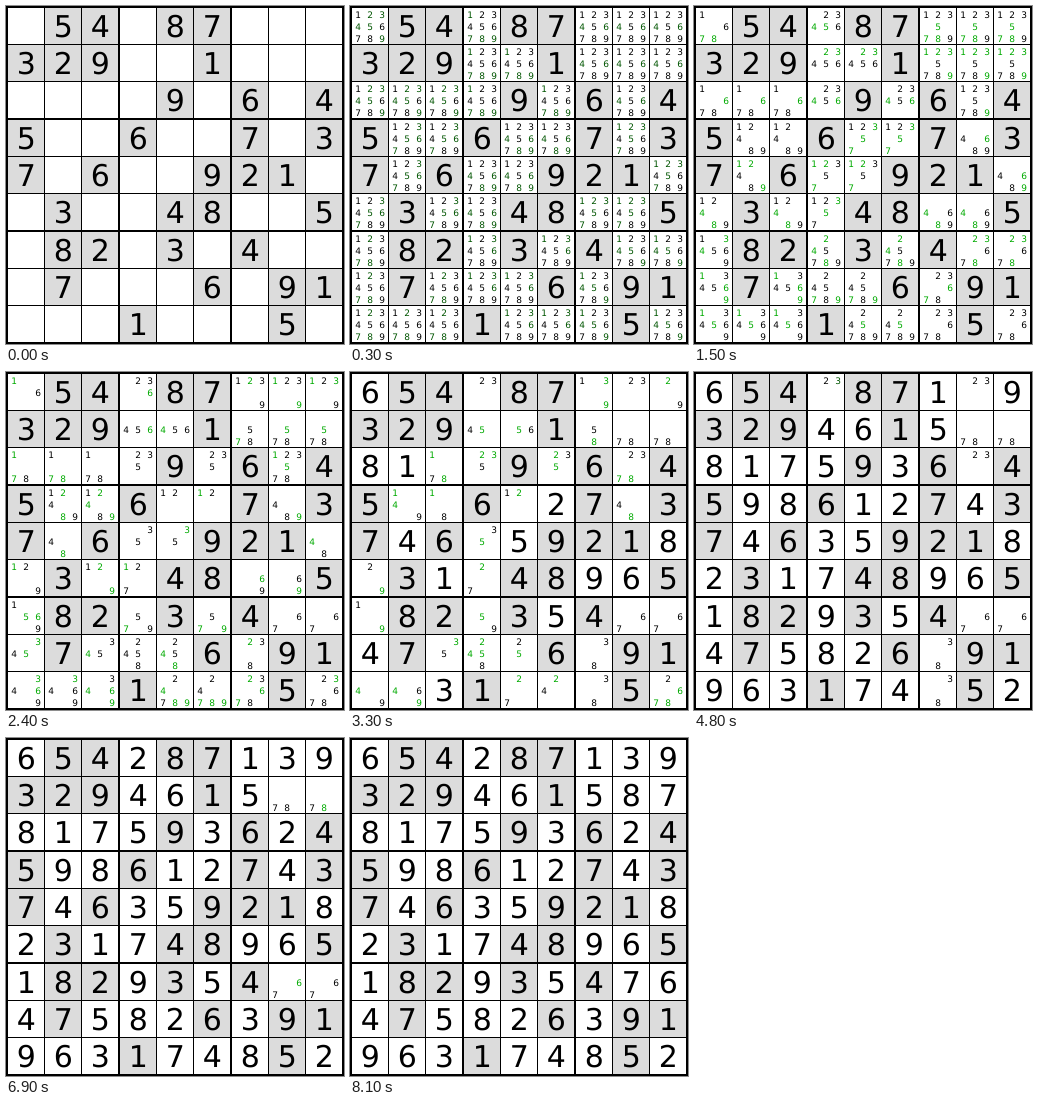
Write an HTML page with a canvas that moves like this. It is 338 px wide and 338 px high and loops after 8400 ms.

```html
<!DOCTYPE html>
<html lang="en">
<head>
<meta charset="utf-8">
<title>Sudoku solver</title>
<style>
html, body { margin: 0; overflow: hidden; background: #fff; }
canvas { display: block; }
</style>
</head>
<body>
<canvas id="board" width="338" height="338"></canvas>
<script>
const ctx = document.getElementById('board').getContext('2d');
const STEP = 300, STEPS = 28;
const SHADES = ['#000', '#050', '#0a0'];
const DIGITS = '123456789';

const givens = '.54.87...329..1.......9.6.45..6..7.37.6..921..3..48..5.82.3.4...7...6.91...1...5.';
const solution = '654287139329461587817593624598612743746359218231748965182935476475826391963174852';

// Candidates left once the columns are checked
const afterColumns = (
  '6 5 4 23 8 7 139 23 29 ' +
  '3 2 9 45 56 1 58 78 78 ' +
  '8 1 178 235 9 235 6 2378 4 ' +
  '5 149 18 6 12 2 7 48 3 ' +
  '7 4 6 35 5 9 2 1 8 ' +
  '29 3 1 27 4 8 9 6 5 ' +
  '19 8 2 59 3 5 4 67 67 ' +
  '4 7 35 2458 25 6 38 9 1 ' +
  '49 469 3 1 27 24 38 5 2678').split(' ');

// Last open pairs: cell -> [candidates, stage that settles it]
const pairs = {
  3: ['23', 6], 7: ['23', 7], 25: ['23', 7], 69: ['38', 7], 78: ['38', 7],
  17: ['78', 8], 61: ['67', 8], 16: ['78', 9], 62: ['67', 9]
};

const row = i => Math.floor(i / 9);
const box = i => Math.floor(i / 27) * 3 + Math.floor(i % 9 / 3);
const without = (digits, i, unit) => [...digits]
  .filter(d => ![...givens].some((g, j) => g === d && unit(j) === unit(i)))
  .join('');

function candidates(stage, i) {
  if (givens[i] !== '.') return givens[i];
  if (stage === 0) return DIGITS;
  if (stage === 1) return without(DIGITS, i, box);
  if (stage === 2) return without(candidates(1, i), i, row);
  if (stage === 3) return afterColumns[i];
  const pair = pairs[i];
  return pair && stage < pair[1] ? pair[0] : solution[i];
}

// Cells are 36 px, thin lines 1 px, block lines 2 px
const edge = n => 2 + n * 37 + Math.floor(n / 3);

function label(digit, size, x, y, color) {
  ctx.font = size + 'px "DejaVu Sans", sans-serif';
  ctx.fillStyle = color;
  ctx.fillText(digit, x, y);
}

function drawCell(i, stage, phase) {
  const x = edge(i % 9), y = edge(row(i));
  ctx.fillStyle = givens[i] === '.' ? '#fff' : '#dcdcdc';
  ctx.fillRect(x, y, 36, 36);

  const now = candidates(stage, i);
  if (now.length === 1) {
    label(now, 30, x + 18.35, y + 29, '#000');
  } else if (stage || phase) {
    const next = candidates(stage + 1, i);
    for (const d of now) {
      const n = d - 1;
      label(d, 9, x + 6.07 + n % 3 * 12, y + 10 + Math.floor(n / 3) * 12,
        next.includes(d) ? '#000' : SHADES[phase]);
    }
  }
}

let shown = -1;
function frame(time) {
  const step = Math.floor(time / STEP) % STEPS;
  if (step !== shown) {
    shown = step;
    ctx.textAlign = 'center';
    ctx.textRendering = 'geometricPrecision';
    ctx.fillStyle = '#000';
    ctx.fillRect(0, 0, 338, 338);
    for (let i = 0; i < 81; i++) drawCell(i, Math.floor(step / 3), step % 3);
  }
  requestAnimationFrame(() => frame(performance.now() - start));
}
const start = performance.now();
frame(0);
</script>
</body>
</html>
```
